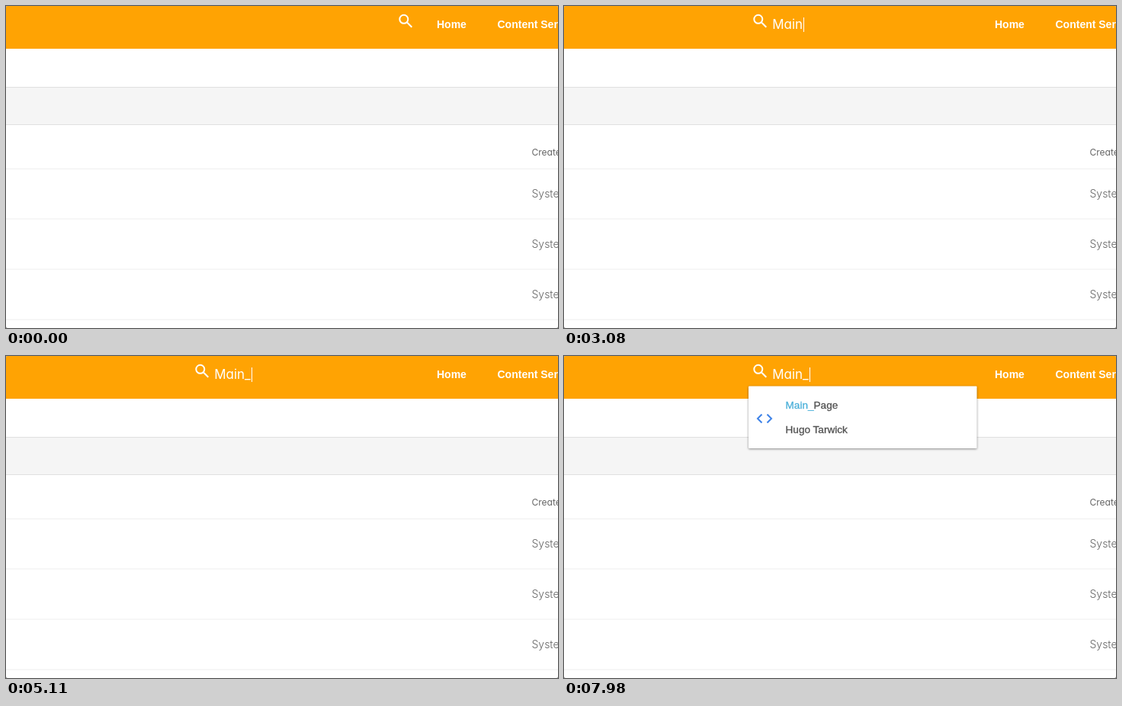
Write an HTML page that moves like this. It is 724x422 px and loops after 8000 ms.

```html
<!DOCTYPE html>
<html lang="en">
<head>
<meta charset="utf-8">
<title>Search suggestions</title>
<style>
  html, body { margin: 0; width: 100%; height: 100%; overflow: hidden; background: #777; }
  svg { display: block; width: 100%; height: 100%; border-radius: 2px; background: #fff; }
  .nav { font: bold 14px "Liberation Sans", Arial, sans-serif; fill: #fff; }
  .geo { font-family: Inter, sans-serif; font-feature-settings: "cv11"; fill: #666; }
  .item { font: 13.6px "Liberation Sans", Arial, sans-serif; fill: #505050; stroke: #505050; stroke-width: .3px; }
  .match { fill: #4bb0d9; stroke: #4bb0d9; }
  .panel { fill: #fff; filter: drop-shadow(0 1px 1.5px rgba(0, 0, 0, .45)); }
  .badge { font: bold 7px "Liberation Sans", Arial, sans-serif; fill: #fff; text-anchor: middle; }
</style>
</head>
<body>
<svg viewBox="0 0 724 422">
  <rect width="724" height="56" fill="#ffa303"/>
  <rect y="106" width="724" height="50" fill="#f5f5f5"/>
  <path d="M0 106.5H724M0 155.5H724" stroke="#e0e0e0"/>
  <path d="M0 213.5H724M0 279H724M0 345H724M0 411H724" stroke="#eee"/>
  <text class="nav" x="565" y="29">Home</text>
  <text class="nav" x="644.5" y="29">Content Services</text>
  <g class="geo">
    <text x="689.5" y="196" font-size="12">Created by</text>
    <g font-size="14" font-weight="300">
      <text x="689.5" y="251">System</text>
      <text x="689.5" y="317">System</text>
      <text x="689.5" y="383">System</text>
    </g>
  </g>
  <g id="search">
    <g fill="none" stroke="#fff" stroke-width="2">
      <circle cx="254.8" cy="17.3" r="5.5"/>
      <path d="M259 21.5L265.3 27.8"/>
    </g>
    <text id="query" class="geo" x="273.2" y="30" font-size="17" style="fill:#fff"></text>
    <rect id="caret" y="15" width="1" height="19" fill="#fff"/>
  </g>
  <g id="longList"></g>
  <g id="shortList"></g>
</svg>
<script>
const LOOP = 8000, STEP = 70;
const SLIDE = { start: 910, length: 280, distance: 267 };
const KEY_TIMES = [2590, 2800, 2870, 3080, 4690];
const CARET_TOGGLES = [1050, 1540, 2030, 3570, 4130, 5180, 5670, 6230, 6790, 7280, 7770];
const LONG_LIST = { open: 3850, close: 4690, codeIcon: 3920 };
const SHORT_LIST = { open: 5250, close: LOOP };

const $ = id => document.getElementById(id);

const icons = {
  doc: y => `<rect x="254" y="${y - 9}" width="18" height="18" fill="#3f83ee"/>`,
  pdf: y => `<rect x="254" y="${y - 9}" width="18" height="18" rx="2" fill="#dc1f68"/>
    <text class="badge" x="263" y="${y + 2.5}">PDF</text>`,
  code: y => `<path class="code" d="M259.5 ${y - 5.5}l-5.5 5.5 5.5 5.5M266.5 ${y - 5.5}l5.5 5.5-5.5 5.5"
    fill="none" stroke="#3f83e8" stroke-width="2"/>`
};

function listMarkup(rows) {
  const panel = `<rect class="panel" x="242" y="39.5" width="299.5" height="${rows.length * 80 + 1.5}" rx="1"/>`;
  return panel + rows.map(([icon, title, owner], i) => {
    const y = i * 80;
    return icons[icon](y + 82) +
      `<text class="item" x="290.5" y="${y + 69}">${title}</text>
       <text class="item" x="290.5" y="${y + 101}">${owner}</text>`;
  }).join('');
}

const marked = (match, rest) => `<tspan class="match">${match}</tspan>${rest}`;
const owner = 'Hugo Tarwick';

$('longList').innerHTML = listMarkup([
  ['doc', 'd_file_unsupported.docx', 'Administrator'],
  ['pdf', 'Tides_and_Greenhouse_T-1.pdf', 'Administrator'],
  ['pdf', 'Tides_and_Greenhouse_T.pdf', 'Administrator'],
  ['code', marked('Main', '_Page'), owner]
]);
$('shortList').innerHTML = listMarkup([['code', marked('Main_', 'Page'), owner]]);
const lateIcon = document.querySelector('#longList .code');

const show = (el, on) => el.setAttribute('visibility', on ? 'visible' : 'hidden');
const countPassed = (times, t) => times.filter(time => t >= time).length;
const isOpen = (list, t) => t >= list.open && t < list.close;

function draw(t) {
  const p = Math.min(1, Math.max(0, (t - SLIDE.start) / SLIDE.length));
  const eased = p * p * (3 - 2 * p);
  $('search').setAttribute('transform', `translate(${SLIDE.distance * (1 - eased)} 0)`);

  $('query').textContent = 'Main_'.slice(0, countPassed(KEY_TIMES, t));
  $('caret').setAttribute('x', Math.round(274 + $('query').getComputedTextLength()));
  show($('caret'), countPassed(CARET_TOGGLES, t) % 2 === 1);

  show($('longList'), isOpen(LONG_LIST, t));
  show(lateIcon, isOpen(LONG_LIST, t) && t >= LONG_LIST.codeIcon);
  show($('shortList'), isOpen(SHORT_LIST, t));
}

const start = performance.now();
function tick() {
  const t = (performance.now() - start) % LOOP;
  draw(Math.floor(t / STEP) * STEP);
  requestAnimationFrame(tick);
}
tick();
</script>
</body>
</html>
```
